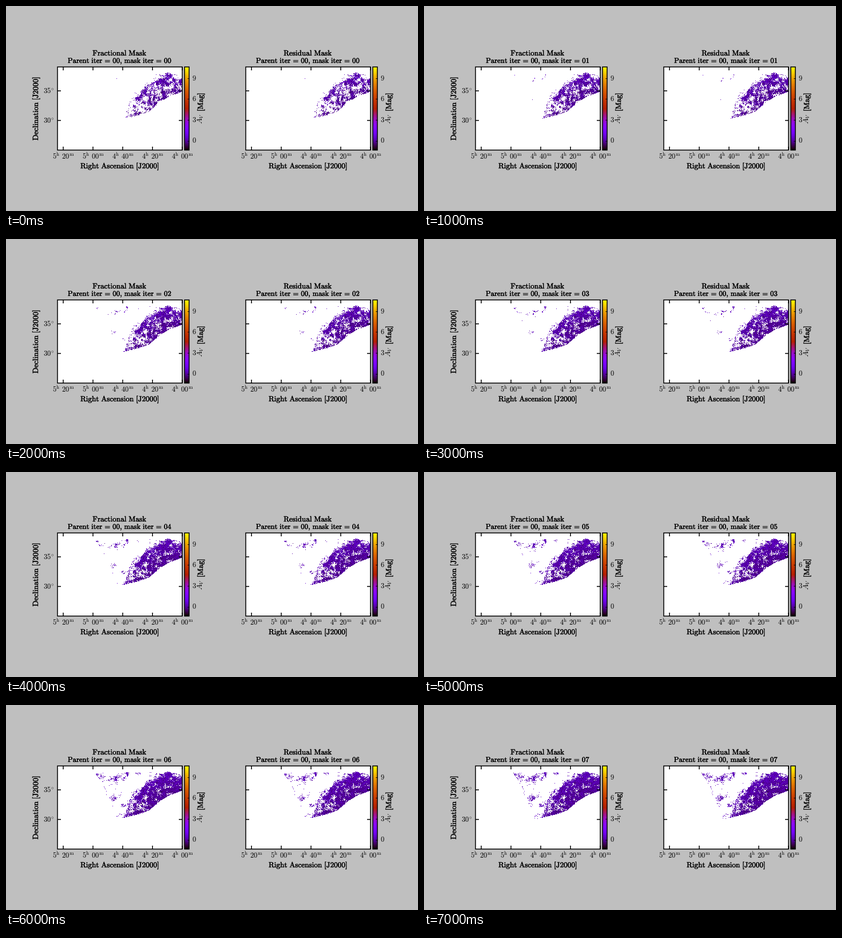
These frames come from a looping animation (720 by 360 pixels, 8 s). A matplotlib script:

```python
import numpy as np
import matplotlib.pyplot as plt
from matplotlib.animation import FuncAnimation
from matplotlib.patches import Rectangle
from matplotlib.path import Path
from matplotlib.patheffects import withStroke

plt.rcParams["mathtext.fontset"] = "cm"

W, H = 720, 360
LEFT, RIGHT, TOP, BOTTOM = 90, 308, 107, 253
PANEL_STEP = 329
STEPS = 8
VMIN, VMAX = -1.35, 10.6
HEAVY = [withStroke(linewidth=0.35, foreground="black")]

fig = plt.figure(figsize=(W / 72, H / 72), dpi=72, facecolor="#bfbfbf")
ax = fig.add_axes([0, 0, 1, 1])


def label(x, y, body, size=13.2, heavy=True, ha="center", rotation=0):
    return ax.text(x, y, f"${body}$", fontsize=size, ha=ha, va="baseline",
                   rotation=rotation, rotation_mode="anchor",
                   path_effects=HEAVY if heavy else None, zorder=5)


def roman(words):
    return r"\mathrm{%s}" % words.replace(" ", r"\ ")


def line(x0, y0, x1, y1, lw=1.5):
    ax.plot([x0, x1], [y0, y1], color="black", lw=lw,
            solid_capstyle="butt", zorder=4)


def box(x, width, **style):
    ax.add_patch(Rectangle((x, TOP), width, BOTTOM - TOP, **style))


def blur(a, sigma):
    t = np.arange(-8, 9)
    k = np.exp(-t**2 / (2 * sigma**2))
    for axis in (0, 1):
        a = np.apply_along_axis(np.convolve, axis, a, k, mode="same")
    return a / a.std()


def build_field():
    """Return the two growing scores and the extinction map."""
    rng = np.random.default_rng(12)
    x, y = np.meshgrid(np.arange(LEFT, RIGHT) + 0.5,
                       np.arange(TOP, BOTTOM) + 0.5)

    footprint = Path([
        (155, 117.5), (264, 117.5), (270, 121), (278, 118), (285, 117),
        (300, 121), (309, 124), (309, 150), (285, 159), (270, 168),
        (262, 175), (250, 185), (235, 191), (215, 196), (197, 200),
        (194, 200), (189, 189), (178, 164), (171, 147), (164, 133),
    ])
    inside = footprint.contains_points(
        np.column_stack([x.ravel(), y.ravel()])).reshape(x.shape)

    # main cloud: soft upper edge, denser towards the right
    edge = np.interp(x, [204, 215, 222, 240, 258, 270, 283, 308],
                     [192, 170, 157, 140, 128, 122, 117, 123])
    along = np.interp(x, [195, 208, 250, 280], [-2.4, -1.1, 0.2, 0.45])
    band = along + 2.5 * (np.clip((y - edge + 6) / 14, -3, 1) - 1)

    # faint clumps: centre, radii, strength
    clumps = [
        (186, 131, 22, 9, 2.5), (187, 164, 12, 6, 2.6), (165, 123, 10, 8, 1.9),
        (206, 122, 10, 6, 2.0), (229, 120, 8, 4, 2.4), (257, 118, 8, 2.5, 2.3),
        (174, 150, 8, 8, 1.5), (195, 195, 6, 5, 2.2), (209, 177, 10, 12, 2.2),
    ]
    faint = np.full(x.shape, -4.8)
    for cx, cy, rx, ry, amp in clumps:
        faint += amp * np.exp(-((x - cx) / rx)**2 - ((y - cy) / ry)**2)

    noise = (0.72 * rng.normal(size=x.shape)
             + 0.7 * blur(rng.normal(size=x.shape), 1.7))
    out = np.where(inside, 0, -99)
    depth = np.clip((y - edge) / 30, 0, 1)
    values = 0.2 - 0.3 * depth + 0.27 * rng.normal(size=x.shape)
    return band + noise + out, faint + noise + out, values


band, faint, values = build_field()


def mask_at(step):
    grow = 1.15 * (step / (STEPS - 1))**0.6
    score = np.maximum(band + grow, faint + 2 * grow)
    return np.ma.masked_where(score <= 0, values)


def iteration_text(step):
    return ("$" + roman("Parent iter") + r"\,=\," + r"\mathrm{00,\,mask\ iter}"
            + r"\,=\," + roman(f"{step:02d}") + "$")


def draw_panel(title, dx):
    x0, x1 = LEFT + dx, RIGHT + dx
    box(x0, x1 - x0, facecolor="white", zorder=1)
    image = ax.imshow(mask_at(0), cmap="gnuplot", vmin=VMIN, vmax=VMAX,
                      extent=(x0, x1, BOTTOM, TOP), aspect="auto",
                      interpolation="nearest", zorder=2)
    box(x0, x1 - x0, fill=False, lw=1.5, zorder=4)

    mid = 199 + dx
    label(mid, 87, roman(title))
    subtitle = label(mid, 100, "0", 12.7)
    label(mid, 285, roman("Right Ascension [J2000]"))

    for i, (hour, minute) in enumerate(
            [(5, "20"), (5, "00"), (4, "40"), (4, "20"), (4, "00")]):
        x = 100 + 52 * i + dx
        line(x, TOP, x, TOP + 6)
        line(x, BOTTOM, x, BOTTOM - 6)
        label(x, 269, r"%d^{\mathrm{h}}\ %s^{\mathrm{m}}" % (hour, minute),
              12.5, heavy=False)
    for y in (149, 201):
        line(x0, y, x0 + 6, y)
        line(x1, y, x1 - 6, y)

    # colour bar
    bar = x1 + 4
    ax.imshow(np.linspace(1, 0, 256)[:, None], cmap="gnuplot", aspect="auto",
              extent=(bar, bar + 8, BOTTOM, TOP), zorder=2)
    box(bar, 8, fill=False, lw=1.5, zorder=4)
    for value in (0, 3, 6, 9):
        y = 236.5 - 12.2 * value
        line(bar + 5, y, bar + 8, y, 1)
        label(bar + 13, y + 4, str(value), 12.5, heavy=False, ha="left")
    label(x1 + 36, 207, "A_V", 13, heavy=False, ha="left", rotation=90)
    label(x1 + 36, 185, roman("[Mag]"), ha="left", rotation=90)
    return image, subtitle


panels = [draw_panel("Fractional Mask", 0),
          draw_panel("Residual Mask", PANEL_STEP)]
label(56, 180, roman("Declination [J2000]"), 13.4, rotation=90)
for degrees, y in ((35, 153), (30, 205)):
    label(84, y, r"%d^{\circ}" % degrees, 12.5, heavy=False, ha="right")

ax.set_xlim(0, W)
ax.set_ylim(H, 0)
ax.axis("off")


def update(step):
    mask = mask_at(step)
    for image, subtitle in panels:
        image.set_data(mask)
        subtitle.set_text(iteration_text(step))


anim = FuncAnimation(fig, update, frames=STEPS, interval=1000, repeat=True,
                     repeat_delay=0, blit=False)
plt.show()
```
